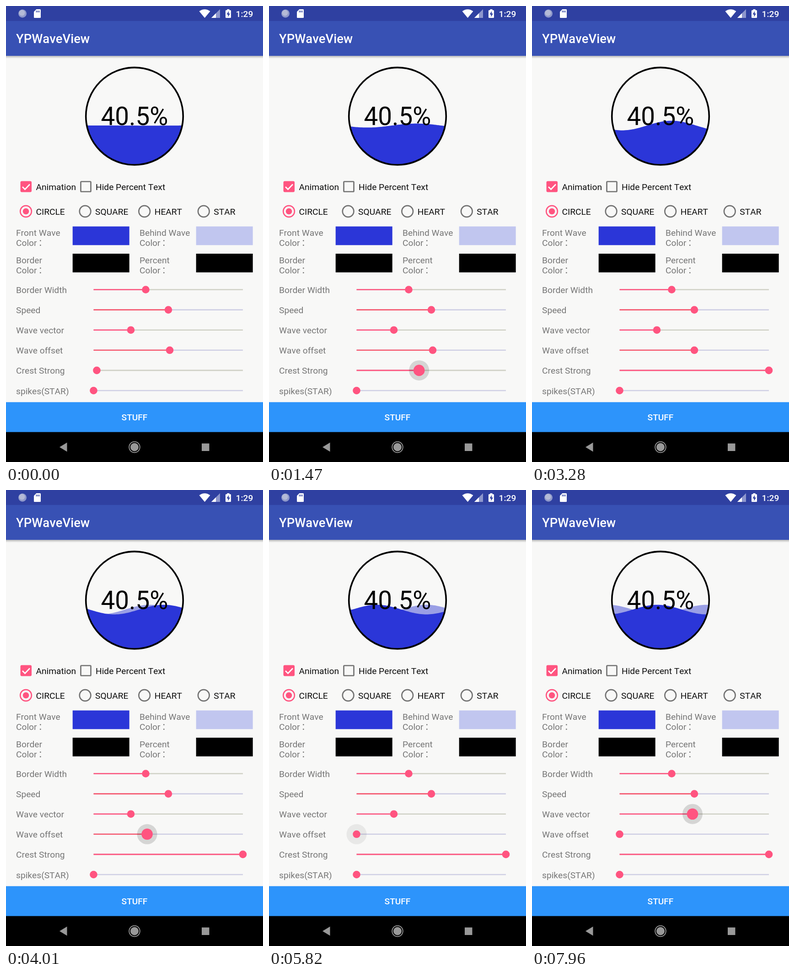
Animation of 562x996 px, one loop 8000 ms. Source, as an HTML page:

```html
<!DOCTYPE html>
<html lang="zh-CN">
<head>
<meta charset="utf-8">
<style>
html, body { margin: 0; width: 100%; height: 100%; overflow: hidden; background: #f8f8f7; }
svg { display: block; width: 100vw; height: 100vh; }
text { font: 19.2px Roboto, "Noto Sans CJK SC", sans-serif; font-kerning: none; fill: #767676; }
.dark { fill: #0c0c0c; }
.medium { font-weight: 500; fill: #fff; }
.title { font-size: 27.4px; }
.percent { font-size: 54.8px; fill: #000; }
.ring { fill: none; stroke: #737373; stroke-width: 2.7; }
.pink { fill: #ff5480; }
.ring.on { stroke: #ff5480; }
</style>
</head>
<body>
<svg viewBox="0 0 562 996" preserveAspectRatio="none">
  <defs>
    <clipPath id="bowl"><circle cx="281" cy="240.700" r="106.500"/></clipPath>
    <linearGradient id="shade" x2="0" y2="1">
      <stop stop-color="#000" stop-opacity=".25"/>
      <stop offset="1" stop-color="#000" stop-opacity="0"/>
    </linearGradient>
  </defs>
  <rect width="562" height="996" fill="#f8f8f7"/>
  <rect y="108.900" width="562" height="6" fill="url(#shade)"/>
  <rect width="562" height="33" fill="#2f40a1"/>
  <rect y="32.700" width="562" height="76.200" fill="#3851b4"/>

  <!-- status bar -->
  <circle cx="36" cy="16.500" r="9" fill="#8f99cb"/>
  <circle cx="35" cy="15" r="6.500" fill="#b4bad6"/>
  <path d="M66.500 7H74.500Q76 7 76 8.500V24.500Q76 26 74.500 26H62.500Q61 26 61 24.500V12.500Z" fill="#fff"/>
  <path d="M66.500 10v4M69.500 10v4M72.500 10v4" stroke="#2f40a1" stroke-width="1.500"/>
  <path d="M422.500 11.500Q434.500 3 446.500 11.500L434.500 26Z" fill="#fff"/>
  <path d="M468 7V26H449Z" fill="#8e97cd"/>
  <path d="M459 16V26H449Z" fill="#fff"/>
  <path d="M483.500 7V9H481.500Q480 9 480 10.500V24.500Q480 26 481.500 26H490.500Q492 26 492 24.500V10.500Q492 9 490.500 9H488.500V7Z" fill="#fff"/>
  <path d="M487 11L482.500 18.500H485.500V24L490 16.500H487Z" fill="#2f40a1"/>
  <text class="medium" x="502.500" y="24">1:29</text>
  <text class="medium title" x="22" y="81">YPWaveView</text>

  <!-- wave view -->
  <g clip-path="url(#bowl)">
    <path id="behind" fill="#9a9fe5"/>
    <path id="front" fill="#2b36d8"/>
  </g>
  <circle cx="281" cy="240.700" r="106.300" fill="none" stroke="#000" stroke-width="3.600"/>
  <text class="percent" x="281" y="260" text-anchor="middle">40.5%</text>

  <!-- check boxes -->
  <rect class="pink" x="31.500" y="382.500" width="24.500" height="24" rx="3"/>
  <path d="M36 395L41.500 400.500L52 389.500" fill="none" stroke="#fff" stroke-width="2.700"/>
  <rect class="ring" x="163.500" y="383.500" width="22" height="22" rx="1.500"/>
  <text class="dark" x="65.500" y="401.500">Animation</text>
  <text class="dark" x="196" y="401.500">Hide Percent Text</text>

  <g id="options"></g>
  <g id="swatches"></g>
  <g id="sliders"></g>

  <rect y="865.300" width="562" height="66" fill="#2d94fb"/>
  <text class="medium" x="281" y="905" text-anchor="middle">STUFF</text>
  <rect y="930.600" width="562" height="65.400" fill="#000"/>
  <g fill="#999">
    <path d="M117 963.500L133.500 953.500V973.500Z"/>
    <circle cx="281" cy="963.500" r="9"/>
    <circle cx="281" cy="963.500" r="11.800" fill="none" stroke="#999" stroke-width="1.800"/>
    <rect x="428" y="955.500" width="16.500" height="16.500"/>
  </g>
</svg>
<script>
const LOOP = 8000, TRACK_LEFT = 191.5, TRACK_RIGHT = 518;
const LEVEL = 261.2, PERIOD = 216, CREST = 10.5;
const byId = id => document.getElementById(id);

function add(parent, tag, attrs, text = '') {
  const node = document.createElementNS('http://www.w3.org/2000/svg', tag);
  for (const key in attrs) node.setAttribute(key, attrs[key]);
  node.textContent = text;
  return parent.appendChild(node);
}

['CIRCLE', 'SQUARE', 'HEART', 'STAR'].forEach((name, i) => {
  const x = 43.5 + i * 129.6, on = i === 0;
  add(byId('options'), 'circle', { class: on ? 'ring on' : 'ring', cx: x, cy: 448.5, r: 12.3 });
  if (on) add(byId('options'), 'circle', { class: 'pink', cx: x, cy: 448.5, r: 6.8 });
  add(byId('options'), 'text', { class: 'dark', x: x + 22, y: 456 }, name);
});

[['Front Wave', '#2b36d8'], ['Behind Wave', '#c1c6ef'], ['Border', '#000'], ['Percent', '#000']]
  .forEach(([name, fill], i) => {
    const x = 22 + (i % 2) * 270, y = 481.5 + (i >> 1) * 59.5, group = byId('swatches');
    add(group, 'text', { x, y: y + 20.5 }, name);
    const label = add(group, 'text', { x, y: y + 42.5 }, 'Color');
    add(label, 'tspan', { dx: 3 }, '：');
    add(group, 'rect', { x: x + 123.7, y, width: 124, height: 40.8, fill });
  });

const sliders = ['Border Width', 'Speed', 'Wave vector', 'Wave offset', 'Crest Strong', 'spikes(STAR)']
  .map((name, i) => {
    const y = 619.5 + i * 44.1, group = byId('sliders');
    add(group, 'text', { x: 22, y: y + 7.5 }, name);
    const line = stroke => add(group, 'path',
      { d: `M${TRACK_LEFT} ${y}H${TRACK_RIGHT}`, stroke, 'stroke-width': 2.6 });
    line(i % 2 ? '#cfcfe4' : '#d0d1c6');
    return {
      y,
      fill: line(i % 2 ? '#f75a70' : '#ff5480'),
      ripple: add(group, 'circle', { cy: y, r: 22, fill: '#000' }),
      thumb: add(group, 'circle', { class: 'pink', cy: y })
    };
  });

// Linear interpolation through [time, value] points.
function along(points, t) {
  const next = points.findIndex(p => p[0] > t);
  if (next === 0) return points[0][1];
  if (next < 0) return points[points.length - 1][1];
  const [t0, a] = points[next - 1], [t1, b] = points[next];
  return a + (b - a) * (t - t0) / (t1 - t0);
}

const thumbPaths = [
  [[0, 305.5]],
  [[0, 355]],
  [[0, 273], [6690, 273], [6820, 289], [7960, 351]],
  [[0, 358], [3180, 358], [3250, 355], [3480, 355], [4750, 244], [5380, TRACK_LEFT]],
  [[0, 198.5], [620, 198.5], [1470, 328], [2480, TRACK_RIGHT]],
  [[0, TRACK_LEFT]]
];
const presses = { 2: [6720, 9000], 3: [3480, 5560], 4: [620, 2620] };
const crestPath = [[0, 205], [620, 244], [1470, 322], [2550, 476], [3280, 521],
  [4750, 601], [5820, 668], [6820, 735], [7960, 922], [8000, 926]];
const fraction = x => (x - TRACK_LEFT) / (TRACK_RIGHT - TRACK_LEFT);

function wave(crestX, height) {
  let d = 'M170 360';
  for (let x = 170; x <= 392; x += 3)
    d += `L${x} ${(LEVEL - height * Math.cos((x - crestX) / PERIOD * 2 * Math.PI)).toFixed(2)}`;
  return d + 'V360Z';
}

function draw() {
  const t = performance.now() % LOOP;
  const xs = thumbPaths.map(path => along(path, t));

  sliders.forEach(({ y, fill, ripple, thumb }, i) => {
    const [down, up] = presses[i] || [LOOP * 2, LOOP * 3];
    const grow = along([[down, 0], [down + 130, 1], [up, 1], [up + 150, 0]], t);
    const glow = along([[down + 50, 0], [down + 250, .14], [up, .14], [up + 500, 0]], t);
    fill.setAttribute('d', `M${TRACK_LEFT} ${y}H${xs[i]}`);
    thumb.setAttribute('cx', xs[i]);
    thumb.setAttribute('r', 8.3 + 4 * grow);
    ripple.setAttribute('cx', xs[i]);
    ripple.setAttribute('opacity', glow);
  });

  const crestX = along(crestPath, t), height = CREST * fraction(xs[4]);
  const lag = PERIOD * (.5 - fraction(xs[3]));
  byId('front').setAttribute('d', wave(crestX, height));
  byId('behind').setAttribute('d', wave(crestX - lag, height));
  requestAnimationFrame(draw);
}
draw();
</script>
</body>
</html>
```
